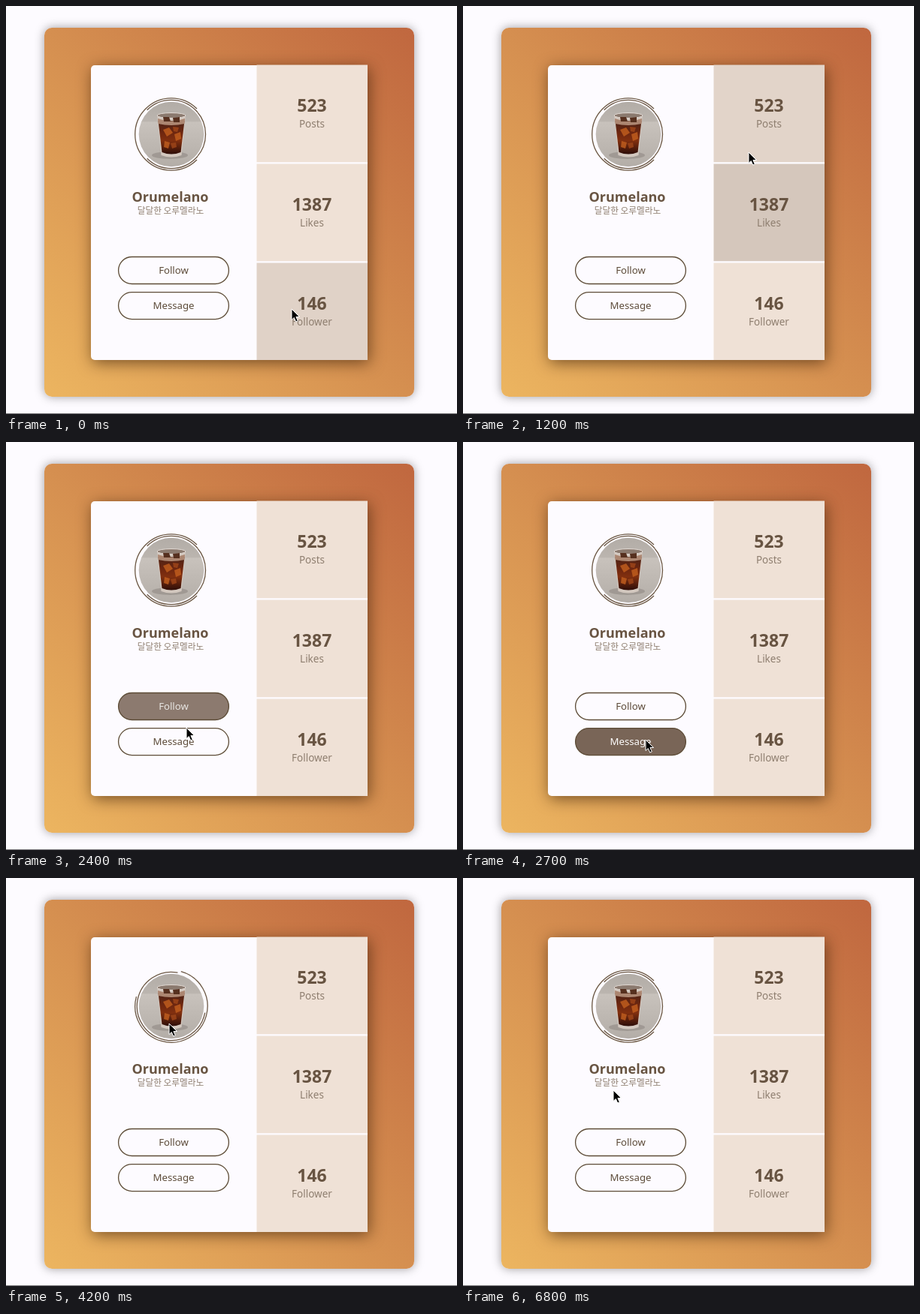
Animation of 600x544 px, one loop 6.9 s. Source, as an HTML page:

```html
<!DOCTYPE html>
<html lang="en">
<head>
<meta charset="utf-8">
<title>Profile card</title>
<style>
  html, body { margin: 0; width: 100%; height: 100%; overflow: hidden; background: #fdfbff; }
  #stage { position: absolute; left: 0; top: 0; width: 600px; height: 544px; overflow: hidden; }
  #stage > * { position: absolute; }
  #frame { left: 51px; top: 29px; width: 492px; height: 492px; border-radius: 10px;
    background: linear-gradient(45deg, #ecb560, #d58f50 50%, #c0673f);
    box-shadow: 0 0 13px rgba(0, 0, 0, .38); }
  #card { left: 112.5px; top: 78.5px; width: 368.5px; height: 393.5px; border-radius: 5px 0 0 5px;
    background: #fdfbff; box-shadow: 2px 4px 20px rgba(50, 25, 5, .6); }
  #floor { left: 0; top: 543px; width: 600px; height: 1px; background: #77757a; }
  svg { left: 0; top: 0; }
  text { font-family: "Noto Sans", "Open Sans", sans-serif; text-anchor: middle; fill: #5d4c3a; }
  .count { font-size: 23px; font-weight: 700; fill: #685442; }
  .label { font-size: 13.5px; font-weight: 300; fill: #8f7f70; }
  .name { font-size: 18px; font-weight: 700; fill: #685442; }
  .sub { font-family: "Noto Sans CJK KR", "Noto Sans CJK", sans-serif; font-size: 11.7px; font-weight: 300; fill: #8f7f70; }
  .btn { font-size: 13.2px; }
  .ring { fill: none; stroke: #6b5743; stroke-width: 1.3; }
</style>
</head>
<body>
<div id="stage">
  <div id="frame"></div>
  <div id="card"></div>
  <div id="floor"></div>
  <svg width="600" height="544" viewBox="0 0 600 544">
    <defs>
      <clipPath id="disc"><circle cx="220" cy="171" r="43.3"/></clipPath>
      <linearGradient id="wall" x2="0" y2="1">
        <stop offset="0" stop-color="#b2aca6"/><stop offset=".3" stop-color="#bbb5af"/>
        <stop offset=".32" stop-color="#c8c2bc"/><stop offset="1" stop-color="#b3ada7"/>
      </linearGradient>
      <linearGradient id="drink" x2="0" y2="1">
        <stop offset="0" stop-color="#4a2318"/><stop offset=".35" stop-color="#6d260f"/>
        <stop offset=".6" stop-color="#82300f"/><stop offset="1" stop-color="#2d0d08"/>
      </linearGradient>
    </defs>

    <g id="rows"></g>

    <g clip-path="url(#disc)">
      <rect x="176" y="127" width="88" height="88" fill="url(#wall)"/>
      <ellipse cx="218" cy="199" rx="24" ry="5" fill="#8d8680" opacity=".55"/>
      <path d="M201 145 H239 L233.5 199 Q220 204 206.500 199 Z" fill="#d3c8bf"/>
      <path d="M202.500 153 H237.500 L232.500 195 Q220 200 207.500 195 Z" fill="url(#drink)"/>
      <ellipse cx="220" cy="146" rx="19" ry="3.500" fill="#8b7a6f" stroke="#e2dad4"/>
      <path d="M202 150 Q220 157 238 150 L237.500 157 Q220 161 202.500 157 Z" fill="#ac8671"/>
      <path d="M209 148 h8 l2 6 h-9 Z M222 149 l9 -1 v7 h-8 Z" fill="#56301f"/>
      <path d="M209 165 l8 -3 5 7 -8 5 Z M224 171 l8 -3 1 9 -7 3 Z M211 180 l7 2 -2 8 -6 -2 Z" fill="#c4601f" opacity=".8"/>
      <path d="M222 161 l8 1 -2 6 -5 -1 Z M219 183 l7 -1 1 6 -6 2 Z" fill="#a1461a" opacity=".8"/>
    </g>
    <path id="inner" class="ring"/>
    <path id="outer" class="ring"/>

    <text class="name" x="218.5" y="260.500">Orumelano</text>
    <text class="sub" x="219" y="277">달달한 오루멜라노</text>
    <g id="buttons"></g>

    <path id="arrow" d="M0 0 V14.500 L3.300 11.500 L5.700 17 L8.300 15.900 L5.900 10.500 H10.500 Z"
      fill="#000" stroke="#fff" stroke-width="1" stroke-linejoin="round"/>
    <g id="beam" fill="none">
      <path d="M-3.500 -7 Q0 -7 0 -4 Q0 -7 3.500 -7 M0 -4 V5 M-3.500 8 Q0 8 0 5 Q0 8 3.500 8 M-2 2 H2" stroke="#fff" stroke-width="2.600"/>
      <path d="M-3.500 -7 Q0 -7 0 -4 Q0 -7 3.500 -7 M0 -4 V5 M-3.500 8 Q0 8 0 5 Q0 8 3.500 8 M-2 2 H2" stroke="#222" stroke-width="1.200"/>
    </g>
  </svg>
</div>
<script>
const LOOP = 6900, STEP = 100, FADE = 300;
const $ = id => document.getElementById(id);

// hover: [enter, leave] in ms
const rows = [
  { count: "523", label: "Posts", hover: [1080, 1560] },
  { count: "1387", label: "Likes", hover: [480, 1080] },
  { count: "146", label: "Follower", hover: [-130, 480] }
];
const buttons = [
  { label: "Follow", y: 334.5, hover: [1850, 2320] },
  { label: "Message", y: 381.6, hover: [2420, 3135] }
];
const avatarHover = [3600, 4890];

// pointer track: [ms, x, y]
const track = [
  [0, 380, 404], [200, 380, 390], [480, 380, 340], [700, 380, 270], [900, 380, 250],
  [1080, 380, 208], [1200, 380, 195], [1400, 378, 160], [1560, 333, 215],
  [1850, 250, 336], [2100, 238, 352], [2320, 240, 371], [2400, 240, 381],
  [2700, 243, 397], [3000, 240, 395], [3135, 234, 381], [3300, 216, 254],
  [3600, 217, 215], [4200, 217, 194], [4600, 217, 190], [4890, 214, 216],
  [5200, 204, 268], [5500, 200, 283], [6900, 200, 283]
];

$("rows").innerHTML = rows.map((r, i) => {
  const y = 78.5 + 132 * i;
  return `<rect x="333.5" y="${y}" width="147.5" height="${i < 2 ? 129.7 : 129.5}"/>
    <text class="count" x="407" y="${y + 62}">${r.count}</text>
    <text class="label" x="407" y="${y + 83}">${r.label}</text>`;
}).join("");
$("buttons").innerHTML = buttons.map(b =>
  `<rect x="149.6" y="${b.y}" width="146.8" height="36" rx="18" stroke="#5d4c37" stroke-width="1.3"/>
   <text class="btn" x="223" y="${b.y + 22}">${b.label}</text>`).join("");
const rowRects = $("rows").querySelectorAll("rect");
const pills = $("buttons").querySelectorAll("rect");
const pillTexts = $("buttons").querySelectorAll("text");

// CSS ease-in-out: cubic-bezier(.42, 0, .58, 1)
function ease(x) {
  if (x <= 0) return 0;
  if (x >= 1) return 1;
  let lo = 0, hi = 1, s = 0.5;
  for (let i = 0; i < 24; i++) {
    s = (lo + hi) / 2;
    const bx = 3 * s * (1 - s) * (0.42 * (1 - s) + 0.58 * s) + s * s * s;
    if (bx < x) lo = s; else hi = s;
  }
  return s * s * (3 - 2 * s);
}

function hoverLevel(t, [enter, leave], dur) {
  if (t < leave) return ease((t - enter) / dur);
  const top = ease((leave - enter) / dur);
  return top * (1 - ease((t - leave) / (dur * top)));
}

function mix(a, b, k) {
  return `rgb(${a.map((v, i) => Math.round(v + (b[i] - v) * k))})`;
}

// three-quarter circle whose gap is centred on the given angle
function ringPath(r, gap) {
  const at = deg => {
    const a = deg * Math.PI / 180;
    return `${(219.9 + r * Math.cos(a)).toFixed(2)} ${(171 + r * Math.sin(a)).toFixed(2)}`;
  };
  return `M${at(gap + 45)} A${r} ${r} 0 1 1 ${at(gap - 45)}`;
}

function pointerAt(t) {
  const i = Math.max(1, track.findIndex(p => p[0] > t));
  const [t0, x0, y0] = track[i - 1], [t1, x1, y1] = track[i];
  const k = (t - t0) / (t1 - t0);
  return [x0 + (x1 - x0) * k, y0 + (y1 - y0) * k];
}

function draw(t) {
  rows.forEach((r, i) => rowRects[i].setAttribute("fill",
    mix([239, 225, 214], [200, 186, 175], hoverLevel(t, r.hover, FADE))));

  buttons.forEach((b, i) => {
    const k = hoverLevel(t, b.hover, FADE);
    pills[i].setAttribute("fill", mix([253, 251, 255], [120, 100, 86], k));
    pillTexts[i].style.fill = mix([93, 76, 58], [255, 255, 255], k);
  });

  $("inner").setAttribute("d", ringPath(45.6, 180 + 360 * hoverLevel(t, avatarHover, 1350)));
  $("outer").setAttribute("d", ringPath(48.2, -360 * hoverLevel(t, avatarHover, 1500)));

  const [x, y] = pointerAt(t);
  const overText = x > 170 && x < 267 && y > 243 && y < 281;
  const place = `translate(${x.toFixed(1)} ${y.toFixed(1)})`;
  $("arrow").setAttribute("transform", place);
  $("beam").setAttribute("transform", place);
  $("arrow").style.display = overText ? "none" : "";
  $("beam").style.display = overText ? "" : "none";
}

const start = performance.now();
function tick() {
  const t = (performance.now() - start) % LOOP;
  draw(Math.floor(t / STEP) * STEP);
  requestAnimationFrame(tick);
}
tick();
</script>
</body>
</html>
```
